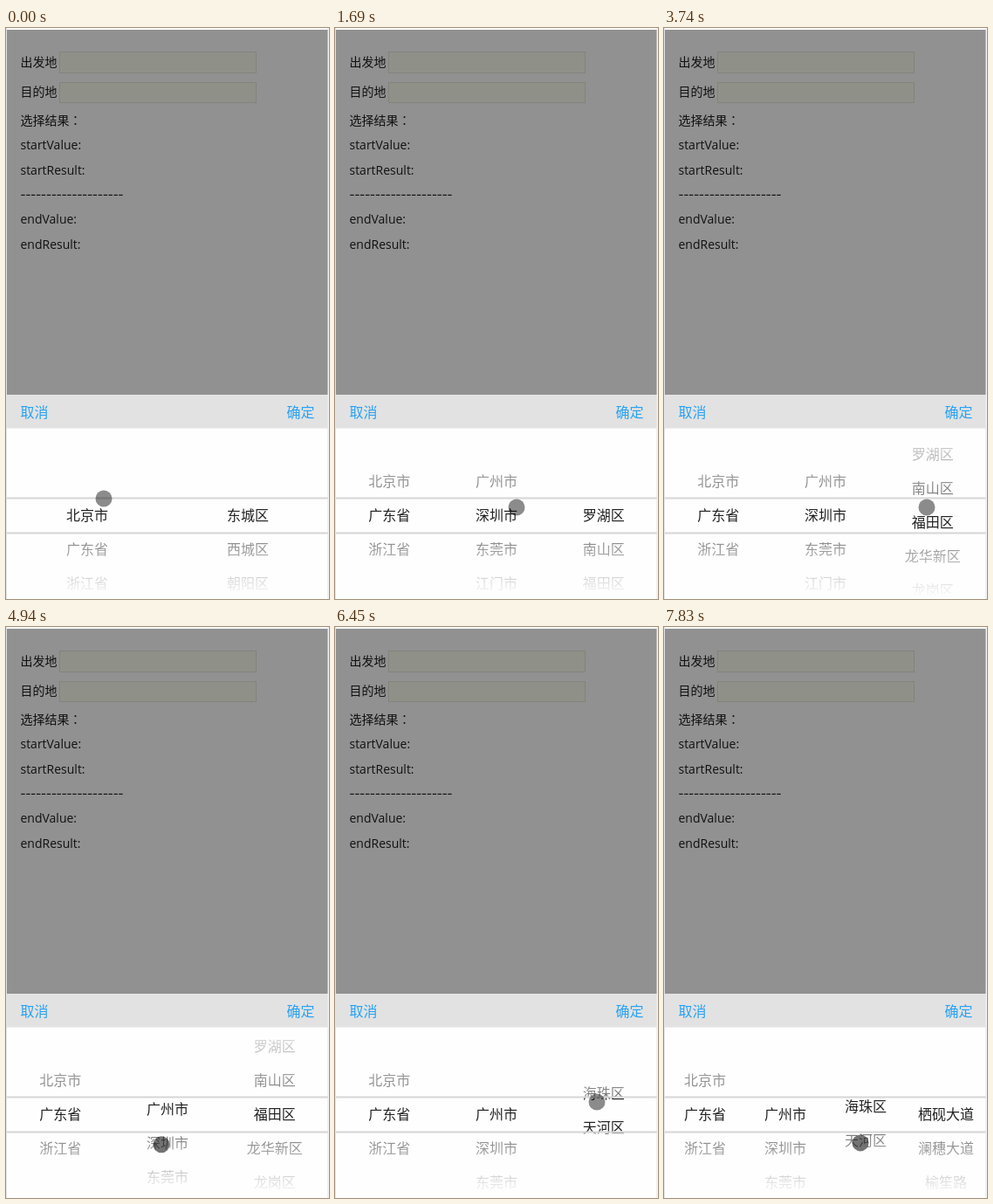
These frames come from a looping animation (370x654 px, 8000 ms). An HTML page:

```html
<!DOCTYPE html>
<html lang="zh-CN">
<head>
<meta charset="utf-8">
<style>
html, body { margin: 0; width: 100%; height: 100%; overflow: hidden; background: #fefefe; }
svg { display: block; width: 370px; height: 654px; font: 14px "Noto Sans CJK SC", "Noto Sans CJK", sans-serif; fill: #111; }
.latin { font-family: "Open Sans", sans-serif; }
.colon { font-family: "Noto Sans CJK TC", "Noto Sans CJK", sans-serif; }
.field { fill: #8f9088; stroke: #82837d; }
.bar { font-size: 16px; fill: #26a2f5; }
#wheels { font-size: 16px; fill: #222; text-anchor: middle; }
</style>
</head>
<body>
<svg viewBox="0 0 370 654">
  <defs>
    <linearGradient id="fadeTop" x1="0" y1="0" x2="0" y2="1">
      <stop stop-color="#fefefe" stop-opacity=".9"/>
      <stop offset="1" stop-color="#fefefe" stop-opacity=".4"/>
    </linearGradient>
    <linearGradient id="fadeBottom" x1="0" y1="0" x2="0" y2="1">
      <stop stop-color="#fefefe" stop-opacity=".4"/>
      <stop offset=".97" stop-color="#fefefe"/>
    </linearGradient>
  </defs>
  <rect width="370" height="654" fill="#fefefe"/>
  <g id="wheels"></g>
  <rect y="459" width="370" height="79" fill="url(#fadeTop)"/>
  <rect y="579" width="370" height="75" fill="url(#fadeBottom)"/>
  <path d="M1 538.5H369M1 578.5H369" stroke="#d6d6d6" stroke-width="2"/>
  <path d="M.5 0V654M369 0V654" stroke="#e2e2e2"/>

  <rect x="1" y="2" width="367.5" height="418" fill="#919191"/>
  <rect class="field" x="61.5" y="27.5" width="225" height="24"/>
  <rect class="field" x="61.5" y="62.5" width="225" height="23"/>
  <text x="16.5" y="44">出发地</text>
  <text x="16.5" y="78">目的地</text>
  <text x="16.5" y="111">选择结果<tspan class="colon" lang="zh-TW">：</tspan></text>
  <g class="latin">
    <text x="16.5" y="138.5">startValue:</text>
    <text x="16.5" y="167.5">startResult:</text>
    <text x="16.5" y="223.5">endValue:</text>
    <text x="16.5" y="252.5">endResult:</text>
  </g>
  <text x="16.5" y="196" font-size="17">--------------------</text>

  <rect x="1" y="420" width="367.5" height="38.5" fill="#e2e2e2"/>
  <g class="bar">
    <text x="16.5" y="446">取消</text>
    <text x="321.5" y="446">确定</text>
  </g>
  <circle id="touch" r="9.5"/>
</svg>
<script>
const LOOP = 8000, STEP = 130, SETTLE = 270;
const ROW = 39, BASELINE = 564, WIDTH = 368;

const regions = {
  北京市: ['东城区', '西城区', '朝阳区'],
  广东省: {
    广州市: { 海珠区: null, 天河区: ['栖砚大道', '澜穗大道', '榆笙路'] },
    深圳市: ['罗湖区', '南山区', '福田区', '龙华新区', '龙岗区'],
    东莞市: null,
    江门市: null
  },
  浙江省: null
};

// Vertical drags of the finger; everything else follows from them
const drag = (level, press, release, x, from, to) => ({ level, press, release, x, from, to });
const drags = [
  drag(0, 0, 360, 112, 539, 516),
  drag(1, 1080, 1420, 208, 594, 549),
  drag(2, 2120, 2410, 299, 597, 558),
  drag(2, 3400, 3770, 301, 580, 549),
  drag(1, 4400, 4990, 178, 560, 593),
  drag(2, 5870, 6500, 300, 568, 544),
  drag(2, 7425, LOOP, 225, 561, 595)
];

const mix = (a, b, p) => a + (b - a) * p;
const progress = (t, start, end) => Math.min(1, Math.max(0, (t - start) / (end - start)));
const easeOut = p => p * (2 - p);
const smooth = p => p * p * (3 - 2 * p);

const fingerY = (d, t) => mix(d.from, d.to, easeOut(progress(t, d.press, d.release)));

// The finger rests while the wheel settles, then glides to the next drag
function fingerAt(t) {
  const i = drags.findLastIndex(d => d.press <= t);
  const now = drags[i], next = drags[i + 1];
  const pressed = t > now.press && t < now.release;
  const glide = next ? smooth(progress(t, now.release + SETTLE, next.press)) : 0;
  return {
    x: mix(now.x, next ? next.x : now.x, glide),
    y: mix(fingerY(now, t), next ? next.from : now.to, glide),
    pressed
  };
}

// Wheels track the finger, snap to the nearest row, then reset all deeper levels
function wheelsAt(t) {
  let selected = [], moving = {};
  for (const d of drags.filter(d => d.press <= t)) {
    const start = (selected[d.level] || 0) * ROW;
    const dragged = start + d.from - fingerY(d, t);
    const row = Math.round((start + d.from - d.to) / ROW);
    const settled = progress(t, d.release, d.release + SETTLE);
    if (settled === 1) {
      selected = [...Array.from({ length: d.level }, (_, i) => selected[i] || 0), row];
    } else {
      moving = { level: d.level, scroll: mix(dragged, row * ROW, smooth(settled)) };
    }
  }
  const wheels = [];
  for (let node = regions; node;) {
    const level = wheels.length, row = selected[level] || 0;
    const labels = Array.isArray(node) ? node : Object.keys(node);
    wheels.push({ labels, scroll: level === moving.level ? moving.scroll : row * ROW });
    node = node[labels[row]];
  }
  return wheels;
}

const root = document.getElementById('wheels');
const touch = document.getElementById('touch');
const make = (tag, parent) =>
  parent.appendChild(document.createElementNS('http://www.w3.org/2000/svg', tag));

let shown = '';
function build(wheels) {
  const key = wheels.map(w => w.labels).join('|');
  if (key === shown) return;
  shown = key;
  root.replaceChildren();
  for (const { labels } of wheels) {
    const group = make('g', root);
    labels.forEach((label, i) => {
      const text = make('text', group);
      text.setAttribute('y', BASELINE + i * ROW);
      text.textContent = label;
    });
  }
}

function draw(time) {
  const t = Math.round(time / STEP) * STEP;
  const wheels = wheelsAt(t);
  build(wheels);
  wheels.forEach(({ scroll }, i) => {
    const x = 1 + WIDTH * (i + 0.5) / wheels.length;
    root.children[i].setAttribute('transform', `translate(${x} ${-scroll})`);
  });
  const finger = fingerAt(t);
  touch.setAttribute('cx', finger.x);
  touch.setAttribute('cy', finger.y);
  touch.setAttribute('fill', `rgba(0,0,0,${finger.pressed ? 0.55 : 0.45})`);
}

const begin = performance.now();
function tick() {
  draw((performance.now() - begin) % LOOP);
  requestAnimationFrame(tick);
}
tick();
</script>
</body>
</html>
```
